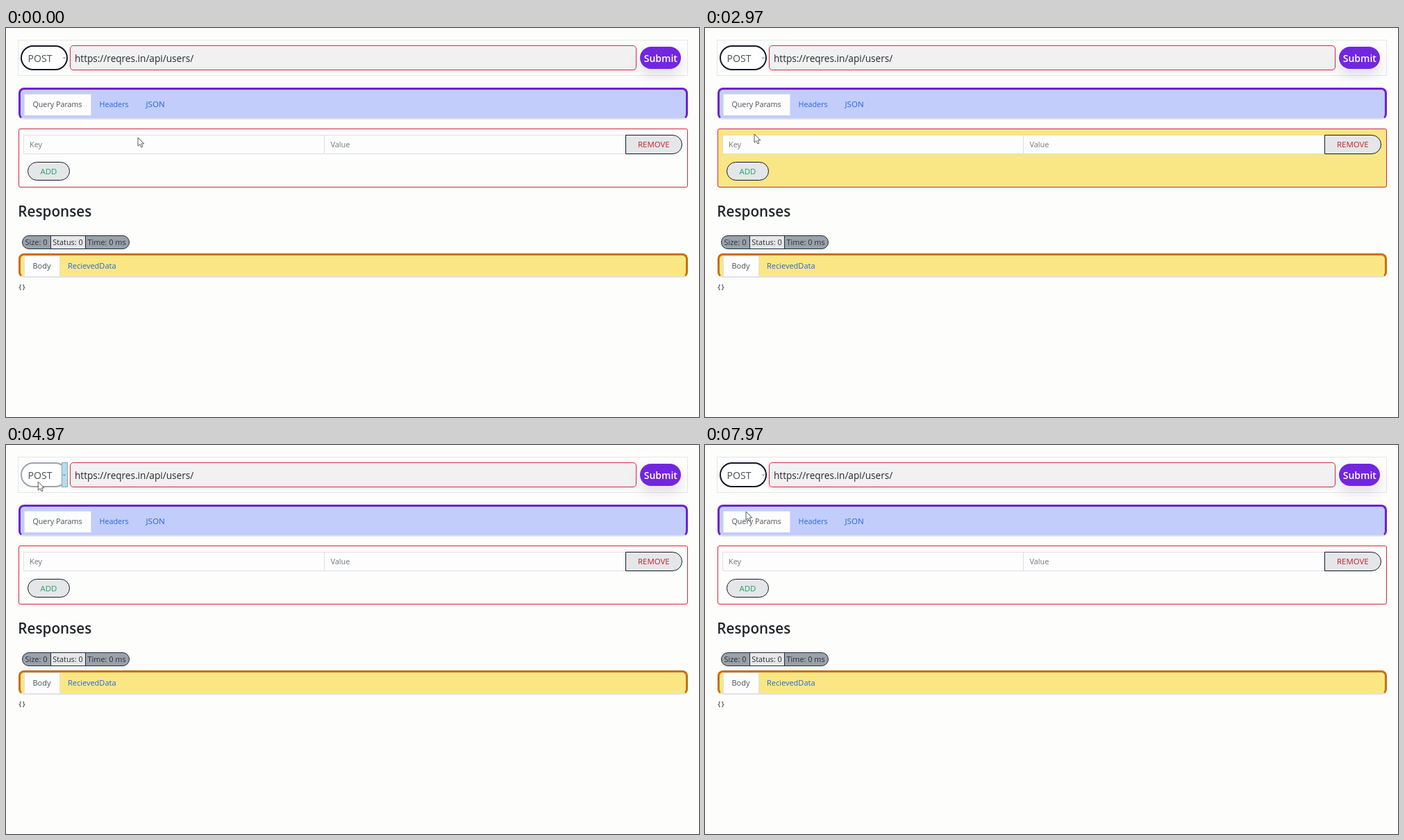
Animation of 998x561 px, one loop 8000 ms. Source, as an HTML page:

```html
<!DOCTYPE html>
<html lang="en">
<head>
<meta charset="utf-8">
<title>Request builder</title>
<style>
  html, body { margin: 0; width: 100%; height: 100%; overflow: hidden; background: #fdfdfc; }
  #stage { position: absolute; left: 0; top: 0; width: 998px; height: 561px; overflow: hidden; }
  #stage div { position: absolute; box-sizing: border-box; }
  svg { position: absolute; left: 0; top: 0; }
  text { font-family: "Open Sans", "Noto Sans", sans-serif; font-size: 10.9px; fill: #4b4f55; }

  .row { left: 17px; top: 17px; width: 965px; height: 51.5px; border: 1px solid #e5e6ec; }
  .method { left: 21px; top: 25px; width: 68px; height: 36px; border: 2px solid #111827; border-radius: 18px; background: #fff; }
  .arrow { left: 79.5px; top: 25px; width: 9.5px; height: 36px; background: #b9dcea; border: 1px solid #7fa9b8; }
  .url { left: 92px; top: 25px; width: 816px; height: 35.5px; border: 1.4px solid #d3304c; border-radius: 5px; background: #f1f1f2; box-shadow: 0 2px 5px rgba(0, 0, 0, .08); }
  .submit { left: 913px; top: 27px; width: 59px; height: 32px; border-radius: 16px; background: #7226df; box-shadow: 0 9px 18px rgba(60, 60, 110, .16); }

  .bar { left: 17.5px; width: 964px; border: 3px solid; border-bottom: 1px solid #dee2e6; border-radius: 8px; }
  .request { top: 86px; height: 45.5px; background: #c2cdfb; border-color: #6d22d4 #6d22d4 #dee2e6; border-bottom-width: 2px; }
  .response { top: 325px; height: 34.5px; background: #fae784; border-color: #c96f0f #c96f0f #dee2e6; border-bottom-width: 2px; }
  .tab { left: 25.5px; background: #fdfdfd; border: 1px solid #dee2e6; border-bottom-color: #fdfdfd; border-radius: 2px 2px 0 0; }

  .panel { left: 17.5px; top: 144.5px; width: 964px; height: 85.5px; border: 1.5px solid #d1263c; border-radius: 3px; }
  .field { top: 154px; height: 28px; background: #fdfdfd; border: 1px solid #dcdee3; }
  .button { background: #e5e6ea; border: 1.4px solid #111827; }
  .badge { top: 298.5px; height: 20.5px; background: #99a2ab; border: 1px solid #1f2937; }
</style>
</head>
<body>
<div id="stage">
  <div class="row"></div>
  <div class="method" id="method"></div>
  <div class="arrow" id="arrow"></div>
  <div class="url"></div>
  <div class="submit"></div>

  <div class="bar request"></div>
  <div class="tab" style="top:94.5px;width:97px;height:31px"></div>

  <div class="panel" id="panel"></div>
  <div class="field" style="left:25px;width:434px"></div>
  <div class="field" style="left:458px;width:435px"></div>
  <div class="button" style="left:892px;top:154px;width:82px;height:28px;border-radius:0 14px 14px 0"></div>
  <div class="button" style="left:30.5px;top:193px;width:61.5px;height:26.5px;border-radius:14px"></div>

  <div class="badge" style="left:23px;width:42px;border-radius:10px 0 0 10px"></div>
  <div class="badge" style="left:114px;width:63.5px;border-radius:0 10px 10px 0"></div>
  <div class="badge" style="left:64px;width:51px;background:#e5e7e8"></div>

  <div class="bar response"></div>
  <div class="tab" style="top:327.5px;width:52px;height:30.5px"></div>

  <svg width="998" height="561" viewBox="0 0 998 561">
    <text x="31.5" y="49" style="font-size:14.1px">POST</text>
    <path d="M82 42.3l1.8 1.8 1.8-1.8" fill="none" stroke="#555" stroke-width=".9"/>
    <text x="99" y="49" style="font-size:13.6px;fill:#25282d">https://reqres.in/api/users/</text>
    <text x="918.7" y="49" style="font-size:14px;font-weight:600;fill:#fff">Submit</text>

    <text x="38.4" y="113.8" style="font-size:10.75px">Query Params</text>
    <g style="--link:#2565dc">
      <text x="134.6" y="113.8" style="font-size:10.75px;fill:var(--link)">Headers</text>
      <text x="201.5" y="113.8" style="font-size:11.6px;fill:var(--link)">JSON</text>
      <text x="89" y="347" style="font-size:11px;fill:var(--link)">RecievedData</text>
    </g>

    <text x="34" y="172.3" style="fill:#70757b">Key</text>
    <text x="467.5" y="172.3" style="fill:#70757b">Value</text>
    <text x="910" y="172.3" style="font-size:11.4px;fill:#bf2026">REMOVE</text>
    <text x="49.5" y="210.8" style="font-size:11.4px;fill:#21a366">ADD</text>

    <text x="17.3" y="271.5" style="font-size:20.7px;font-weight:600;fill:#212529">Responses</text>
    <g style="--ink:#292d32">
      <text x="27.5" y="313.2" style="fill:var(--ink)">Size: 0</text>
      <text x="67.2" y="313.2" style="fill:var(--ink)">Status: 0</text>
      <text x="117.5" y="313.2" style="fill:var(--ink)">Time: 0 ms</text>
    </g>
    <text x="38.4" y="347" style="font-size:11px">Body</text>
    <text x="17.5" y="377" style="font-family:'DejaVu Sans Mono',monospace;font-size:9.2px;fill:#212529">{}</text>

    <path id="cursor" d="M0 0V12.3L2.9 9.7L4.9 14L6.9 13.1L5 8.9H8.8Z" fill="#fdfdfd" stroke="#4a4a4f" stroke-width=".9" stroke-linejoin="round"/>
  </svg>
</div>
<script>
  const LOOP = 8000;
  const FADE = 150;

  // Pointer stops: time, x, y
  const stops = [
    [0, 190, 158], [1200, 194, 157], [1650, 194, 157], [2430, 80, 46],
    [2970, 71, 153], [3200, 71, 153], [3930, 42, 55], [4900, 46, 53],
    [6240, 77, 50], [6650, 77, 50], [7700, 59, 96], [LOOP, 59, 96]
  ];

  const byId = id => document.getElementById(id);
  const method = byId("method"), arrow = byId("arrow"), panel = byId("panel"), cursor = byId("cursor");

  const clamp = v => Math.max(0, Math.min(1, v));
  const ease = p => p * p * (3 - 2 * p);
  const mix = (a, b, p) => a + (b - a) * p;

  // Fades in after start and out after end
  const hover = (t, start, end) => Math.min(clamp((t - start) / FADE), 1 - clamp((t - end) / FADE));

  function pointer(t) {
    const i = stops.findIndex(s => s[0] > t);
    const [t0, x0, y0] = stops[i - 1];
    const [t1, x1, y1] = stops[i];
    const p = ease((t - t0) / (t1 - t0));
    return [mix(x0, x1, p), mix(y0, y1, p)];
  }

  function draw(now) {
    const t = now % LOOP;
    const [x, y] = pointer(t);
    const over = hover(t, 3710, 7020);
    const ring = [17, 24, 39].map((c, i) => Math.round(mix(c, [156, 163, 175][i], over)));

    cursor.setAttribute("transform", `translate(${x.toFixed(2)} ${y.toFixed(2)})`);
    method.style.borderColor = `rgb(${ring})`;
    arrow.style.opacity = over;
    panel.style.backgroundColor = `rgba(249, 230, 132, ${hover(t, 2790, 3350)})`;
    requestAnimationFrame(draw);
  }
  requestAnimationFrame(draw);
</script>
</body>
</html>
```
